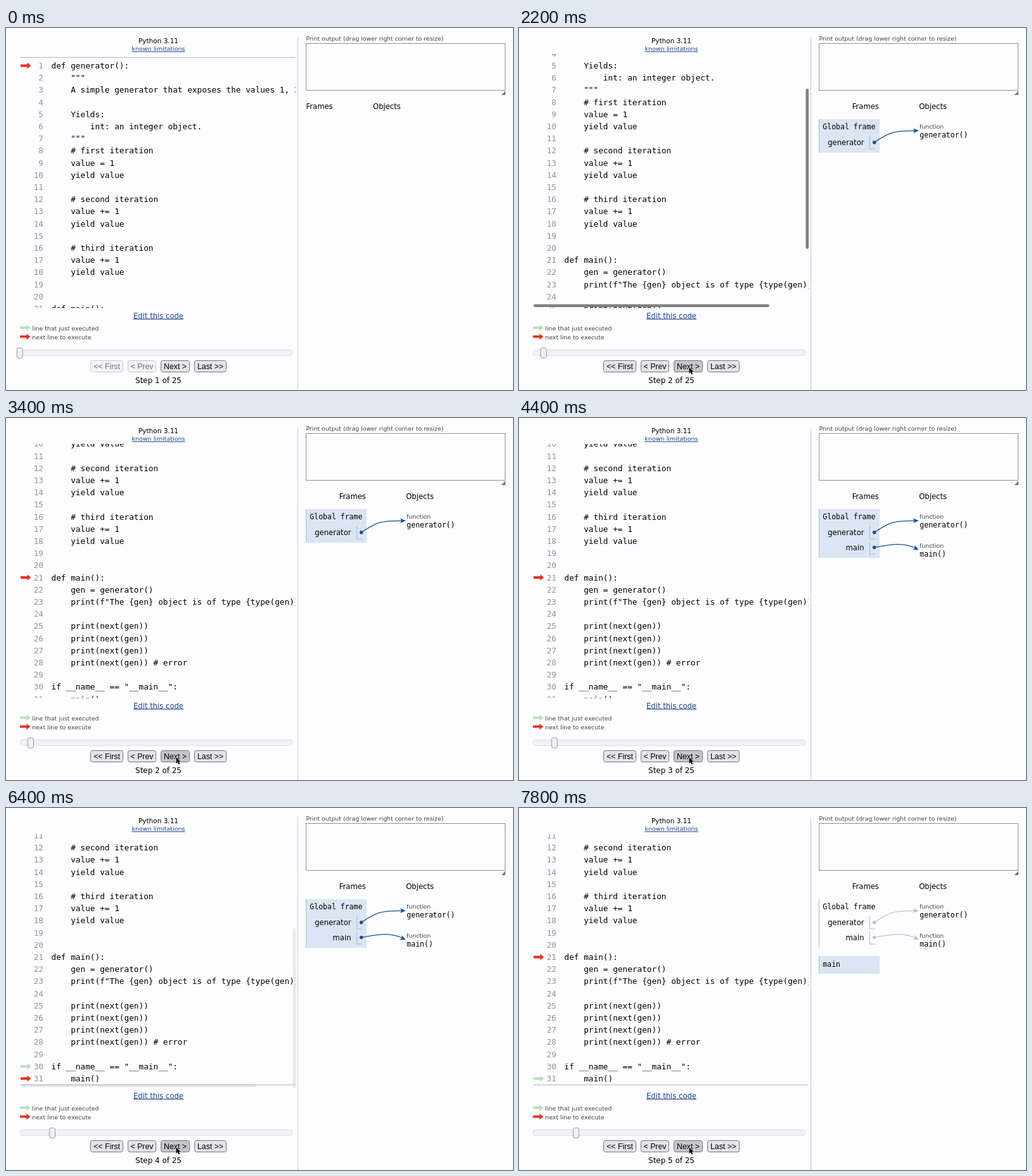
Animation of 800x572 px, one loop 8000 ms. Source, as an HTML page:

```html
<!DOCTYPE html>
<html lang="en">
<head>
<meta charset="utf-8">
<title>Generator walkthrough</title>
<style>
  html, body { margin: 0; width: 100%; height: 100%; overflow: hidden; background: #fdfcfe; }
  svg { display: block; width: 100vw; height: 100vh; }
  text { font-family: "DejaVu Sans", Verdana, sans-serif; font-size: 11.6px; fill: #000; white-space: pre; }
  .mono { font-family: "DejaVu Sans Mono", monospace; font-size: 11.5px; }
  .code { font-size: 12.74px; }
  .num { fill: #949496; text-anchor: end; }
  .small { font-size: 9.38px; fill: #444; }
  .link { fill: #21458c; text-decoration: underline; }
  .mid { text-anchor: middle; }
  .end { text-anchor: end; }
  .button text { font-family: "Liberation Sans", Arial, sans-serif; font-size: 12.3px; text-anchor: middle; }
  .button rect { fill: #e4e3e9; stroke: #77777c; }
  .button.hover rect { fill: #c6c5cb; }
  .button.off rect { fill: #f4f3f6; stroke: #c8c7cb; }
  .button.off text { fill: #707072; }
  .rule { fill: none; stroke: #b4b8bc; }
</style>
</head>
<body>
<svg id="stage" viewBox="0 0 800 572">
  <defs>
    <polygon id="arrow" points="0,-1.9 10.4,-1.9 10.4,-4.7 16.6,0 10.4,4.7 10.4,1.9 0,1.9"/>
    <clipPath id="view"><rect x="16" y="41" width="440.5" height="401.5"/></clipPath>
  </defs>
  <rect width="800" height="572" fill="#fdfcfe"/>

  <text class="mid" x="240.5" y="23.5" style="font-size:10.5px">Python 3.11</text>
  <text class="mid link" x="240.5" y="36" style="font-size:9.5px">known limitations</text>

  <g clip-path="url(#view)">
    <g id="code">
      <path class="rule" d="M22.5 46.5H457M22.5 645.5H457"/>
      <use id="prevArrow" href="#arrow" fill="#b9dfbb"/>
      <use id="nextArrow" href="#arrow" fill="#e9301f"/>
    </g>
  </g>
  <g id="bars" fill="#808080">
    <rect id="vbar" x="452.5" width="4.6" height="253" rx="2.3"/>
    <rect x="23" y="436.5" width="372" height="4.6" rx="2.3"/>
  </g>

  <text class="mid link" x="240.5" y="458.5">Edit this code</text>
  <use href="#arrow" x="22" y="473.7" fill="#b9dfbb"/>
  <use href="#arrow" x="22" y="487.7" fill="#e9301f"/>
  <text class="small" x="41.3" y="478">line that just executed</text>
  <text class="small" x="41.3" y="492">next line to execute</text>

  <rect x="22.5" y="508.5" width="429" height="9" rx="3" fill="#f2f1f3" stroke="#dddce0"/>
  <rect id="handle" y="505.5" width="9" height="16" rx="3" fill="#f1f0f3" stroke="#98979c"/>
  <g id="buttons"></g>
  <text id="label" class="mid" x="240.5" y="561" style="font-size:11.95px"></text>

  <path d="M460.5 15V572" stroke="#cccbd0"/>
  <text class="small" x="473.5" y="20">Print output (drag lower right corner to resize)</text>
  <rect x="473.5" y="24.5" width="314" height="74" fill="#fefefe" stroke="#929195"/>
  <path d="M788 99.5V106H781.5Z" fill="#77767a"/>
  <g id="heads">
    <text x="473.5" y="128">Frames</text>
    <text x="579" y="128">Objects</text>
  </g>
  <g id="heap"></g>

  <path id="cursor" d="M0 0V10L2.4 7.9L4.1 11.6L5.9 10.8L4.2 7.2H7.2Z"
        fill="#000" stroke="#fff" stroke-width=".8" paint-order="stroke"/>
</svg>
<script>
const LOOP = 8000, TICK = 200, LINE = 19.2;

const source = `def generator():
    """
    A simple generator that exposes the values 1, 2 and 3.

    Yields:
        int: an integer object.
    """
    # first iteration
    value = 1
    yield value

    # second iteration
    value += 1
    yield value

    # third iteration
    value += 1
    yield value


def main():
    gen = generator()
    print(f"The {gen} object is of type {type(gen)}")

    print(next(gen))
    print(next(gen))
    print(next(gen))
    print(next(gen)) # error

if __name__ == "__main__":
    main()`;

// One entry per debugger step: start time, arrow lines, scroll offset.
const steps = [
  { at: 0,    prev: 0,  next: 1,  scroll: 0 },
  { at: 2069, prev: 1,  next: 21, scroll: 191.5 },
  { at: 4300, prev: 21, next: 30, scroll: 191.5 },
  { at: 5480, prev: 30, next: 31, scroll: 208 },
  { at: 6900, prev: 31, next: 21, scroll: 208 },
];

const cursorPath = [[1000, 271, 503], [1200, 270.3, 515], [1400, 269, 530], [1600, 268.5, 536]];

const $ = id => document.getElementById(id);
const clamp = x => Math.max(0, Math.min(1, x));
const mix = (a, b, k) => a + (b - a) * k;
const swing = k => 0.5 - Math.cos(k * Math.PI) / 2;

function add(parent, tag, attrs, text) {
  const el = document.createElementNS("http://www.w3.org/2000/svg", tag);
  for (const key in attrs) el.setAttribute(key, attrs[key]);
  if (text) el.textContent = text;
  return parent.appendChild(el);
}

const place = (el, x, y) => el.setAttribute("transform", `translate(${x} ${y})`);
const show = (el, on) => el.setAttribute("visibility", on ? "visible" : "hidden");

source.split("\n").forEach((line, i) => {
  const y = 64 + i * LINE;
  add($("code"), "text", { class: "mono code num", x: 59, y }, String(i + 1));
  add($("code"), "text", { class: "mono code", x: 71.5, y }, line);
});

const [first, prev, next] = [
  ["<< First", 133, 52], ["< Prev", 192, 45], ["Next >", 244, 46], ["Last >>", 297, 51],
].map(([text, x, w]) => {
  const g = add($("buttons"), "g", { class: "button" });
  add(g, "rect", { x: x + 0.5, y: 525.5, width: w - 1, height: 18, rx: 3 });
  add(g, "text", { x: x + w / 2, y: 538.7 }, text);
  return g;
});

const heap = $("heap");
const globalBox = add(heap, "rect", { x: 473, y: 144, width: 96, fill: "#dbe5f3" });
const globalEdge = add(heap, "path", { class: "rule" });
add(heap, "text", { class: "mono", x: 479.3, y: 160 }, "Global frame");

function variable(name, y, objectY, curve, tip) {
  const g = add(heap, "g", {});
  add(g, "text", { class: "end", x: 544.5, y: y + 4.5 }, name);
  add(g, "path", { class: "rule", d: `M553.5 ${y - 10}V${y + 10.5}H562` });
  const wire = add(g, "g", {});
  add(wire, "circle", { cx: 560.7, cy: y, r: 2.8 });
  add(wire, "path", { d: curve, fill: "none", stroke: "currentColor", "stroke-width": 1.3 });
  add(wire, "path", { d: "M0 0L-9 -3.8L-7 0L-9 3.8Z", transform: tip });
  add(g, "text", { class: "small", x: 632, y: objectY }, "function");
  add(g, "text", { class: "mono", x: 632.3, y: objectY + 14.7 }, name + "()");
  return { g, wire };
}

const vars = [
  variable("generator", 180.7, 158.5, "M560.7 180.7C584 165 590 162.3 625 162.3", "translate(631 162.3)"),
  variable("main", 204.5, 204.5, "M560.7 204.5C590 199.5 603 196.5 625 205", "translate(631 208.3) rotate(25)"),
];

const call = add(heap, "g", {});
add(call, "rect", { x: 473, y: 234, width: 96, height: 28, fill: "#dbe5f3" });
add(call, "path", { class: "rule", d: "M473.5 234V262" });
add(call, "text", { class: "mono", x: 479.3, y: 250.5 }, "main");

function drawCode(t, n) {
  const now = steps[n], old = steps[Math.max(0, n - 1)], age = t - now.at;
  const scroll = mix(old.scroll, now.scroll, swing(clamp(age / 300)));
  place($("code"), 0, -scroll);

  const moved = now.scroll !== old.scroll;
  $("bars").setAttribute("opacity", moved ? 1 - clamp((age - 750) / 200) : 0);
  $("vbar").setAttribute("y", 41 + scroll * 0.716);

  // The faint arrow fades out and jumps, then the red one slides.
  const lineY = k => 59.5 + (k - 1) * LINE;
  const faded = age >= 200, mark = faded ? now.prev : old.prev;
  place($("prevArrow"), 23, lineY(mark));
  $("prevArrow").setAttribute("opacity", mark ? (faded ? 1 : 1 - age / 200) : 0);
  place($("nextArrow"), 23, lineY(mix(old.next, now.next, swing(clamp((age - 400) / 250)))));
}

function drawHeap(n) {
  const height = n > 1 ? 77 : 53, inCall = n > 3;
  place($("heads"), n ? 52.2 : 0, 0);
  heap.style.display = n ? "" : "none";
  globalBox.setAttribute("height", height);
  show(globalBox, !inCall);
  globalEdge.setAttribute("d", `M473.5 144v${height}`);
  vars.forEach(({ g, wire }, i) => {
    show(g, n > i);
    const color = inCall ? "#c2c2c4" : "#234d8d";
    wire.setAttribute("fill", color);
    wire.setAttribute("color", color);
  });
  show(call, inCall);
}

function drawCursor(t) {
  show($("cursor"), t >= cursorPath[0][0]);
  let [, x, y] = cursorPath[cursorPath.length - 1];
  for (let i = 1; i < cursorPath.length; i++) {
    const [t0, x0, y0] = cursorPath[i - 1], [t1, x1, y1] = cursorPath[i];
    if (t < t1) {
      const k = clamp((t - t0) / (t1 - t0));
      x = mix(x0, x1, k);
      y = mix(y0, y1, k);
      break;
    }
  }
  place($("cursor"), x, y);
  next.classList.toggle("hover", t >= cursorPath[0][0] && y > 525);
}

function draw(time) {
  const t = Math.floor((time % LOOP) / TICK) * TICK;
  const n = steps.filter(s => s.at <= t).length - 1;
  drawCode(t, n);
  drawHeap(n);
  drawCursor(t);
  first.classList.toggle("off", n === 0);
  prev.classList.toggle("off", n === 0);
  $("handle").setAttribute("x", 17.2 + n * 17.1);
  $("label").textContent = `Step ${n + 1} of 25`;
}

let start;
function tick(now) {
  start ??= now;
  draw(now - start);
  requestAnimationFrame(tick);
}
draw(0);
requestAnimationFrame(tick);
</script>
</body>
</html>
```
